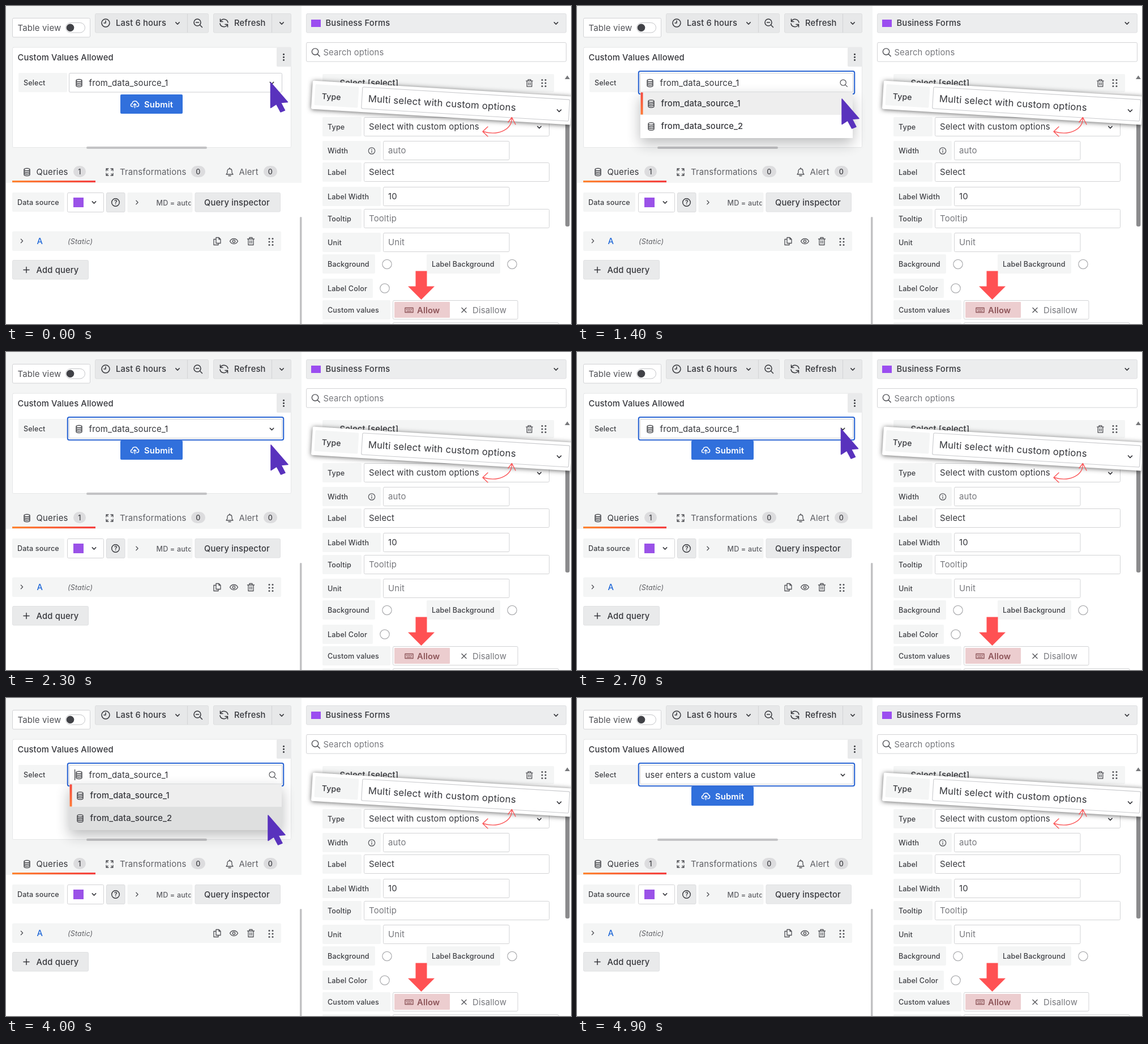
Animation, 998 px wide and 561 px high, one loop 6.2 s. Source, as an HTML page with a canvas:

```html
<!DOCTYPE html>
<html lang="en">
<head>
<meta charset="utf-8">
<title>Custom values</title>
<style>
  html, body { margin: 0; width: 100%; height: 100%; overflow: hidden; background: #fff; }
  canvas { display: block; }
</style>
</head>
<body>
<canvas id="stage" width="998" height="561"></canvas>
<script>
const ctx = document.getElementById('stage').getContext('2d');
const LOOP = 6200, STEP = 100;
const INK = '#36373c', MUTED = '#77787d', SOFT = '#f4f5f5', BUTTON = '#e9eaeb', LINE = '#d2d3d5';
const HOVER = '#dedfdf', PICKED = '#eeeeee', ALLOW = '#8d5559', ICON = '#505156';
const BODY = 14.95;
const SMALL = { size: 12.6, weight: 500, color: '#3f4045' };
const TITLE = { size: 14.75, weight: 500 };
const TYPED = 'user enters a custom value';

function box(x1, y1, x2, y2, fill, stroke, radius = 2, width = 1) {
  ctx.beginPath();
  ctx.roundRect(x1, y1, x2 - x1, y2 - y1, radius);
  if (fill) { ctx.fillStyle = fill; ctx.fill(); }
  if (stroke) { ctx.strokeStyle = stroke; ctx.lineWidth = width; ctx.stroke(); }
}

// y is the vertical middle of the capitals
function text(str, x, y, { size = BODY, weight = 400, color = INK, style = '', align = 'left' } = {}) {
  ctx.font = `${style} ${weight} ${size}px Inter, sans-serif`;
  ctx.letterSpacing = size * 0.0107 + 'px';
  ctx.textAlign = align;
  ctx.fillStyle = color;
  ctx.fillText(str, x, y + size * 0.36);
  return ctx.measureText(str).width;
}

function disc(x, y, r, fill, stroke, width = 1.3) {
  ctx.beginPath();
  ctx.arc(x, y, r, 0, Math.PI * 2);
  if (fill) { ctx.fillStyle = fill; ctx.fill(); }
  if (stroke) { ctx.strokeStyle = stroke; ctx.lineWidth = width; ctx.stroke(); }
}

const ICONS = {
  down: 'M-3.2-1.6L0 1.6L3.2-1.6',
  right: 'M-1.6-3.2L1.6 0L-1.6 3.2',
  plus: 'M-5 0H5M0-5V5',
  cross: 'M-4-4L4 4M4-4L-4 4',
  clock: 'M7 0A7 7 0 1 1-7 0A7 7 0 1 1 7 0M0-4V0H-3',
  zoom: 'M5-1A6 6 0 1 1-7-1A6 6 0 1 1 5-1M3.3 3.3L7.5 7.5',
  minus: 'M-3.5-1H1.5',
  refresh: 'M-6.5-7V-2.5H-2M-6-3A7 7 0 0 1 7-1M6.5 7V2.5H2M6 3A7 7 0 0 1-7 1',
  database: 'M-5-4.5C-5-7.3 5-7.3 5-4.5C5-1.8-5-1.8-5-4.5V4.5C-5 7.3 5 7.3 5 4.5V-4.5M-5-1.5C-5 1.2 5 1.2 5-1.5M-5 1.5C-5 4.2 5 4.2 5 1.5',
  cloud: 'M-3 4H-4C-8 4-8-1-4.5-1.5C-4-7 4-7 4.5-2.5C8-2 8 4 4 4H3M0 6V-1M-2.5 1.2L0-1.3L2.5 1.2',
  process: 'M-6-2V-6H-2M2-6H6V-2M6 2V6H2M-2 6H-6V2M-6-6L-3-3M6-6L3-3M6 6L3 3M-6 6L-3 3',
  bell: 'M-6 4H6L4 1V-2C4-7-4-7-4-2V1ZM-2 6.5H2M0-6V-7.5',
  copy: 'M-2-6.5H3L6-3.5V3.5H-2ZM-2-3.5H-6V6.5H2V3.5M3-6.5V-3.5H6',
  eye: 'M-7 0C-4-6 4-6 7 0C4 6-4 6-7 0ZM2.2 0A2.2 2.2 0 1 1-2.2 0A2.2 2.2 0 1 1 2.2 0',
  trash: 'M-6-4H6M-2.5-4V-6.5H2.5V-4M-4.5-4V6.5H4.5V-4M-1.5-1V3.5M1.5-1V3.5',
  keyboard: 'M-7-4H7V4H-7ZM-4.5-1.3H-3M-1-1.3H1M3-1.3H4.5M-4 1.6H4',
  info: 'M5.7 0A5.7 5.7 0 1 1-5.7 0A5.7 5.7 0 1 1 5.7 0M0-.5V3M0-3V-2'
};
for (const name in ICONS) ICONS[name] = new Path2D(ICONS[name]);

function icon(name, x, y, color = ICON, width = 1.3, scale = 1) {
  ctx.save();
  ctx.translate(x, y);
  ctx.scale(scale, scale);
  ctx.strokeStyle = color;
  ctx.lineWidth = width;
  ctx.lineCap = ctx.lineJoin = 'round';
  ctx.stroke(ICONS[name]);
  ctx.restore();
}

function grip(x, y) {
  for (const dx of [-3, 3]) for (const dy of [-5.5, 0, 5.5]) disc(x + dx, y + dy, 1.5, ICON);
}

function label(str, x1, x2, y) {
  box(x1, y, x2, y + 34, SOFT);
  text(str, x1 + 9, y + 17, SMALL);
}

function field(str, x1, x2, y, color = INK) {
  box(x1 + .5, y + .5, x2 - .5, y + 33.5, '#fff', LINE);
  text(str, x1 + 9, y + 17, { color });
}

function button(str, x1, x2, y, textX) {
  box(x1 + .5, y + .5, x2 - .5, y + 34, BUTTON, '#e0e1e3');
  text(str, textX, y + 17.5, TITLE);
}

function badge(str, x1, x2) {
  box(x1, 282, x2, 302, '#dcdcde', null, 10);
  text(str, (x1 + x2) / 2, 292.5, { ...SMALL, align: 'center' });
}

function drawToolbar() {
  box(11.5, 21.5, 148.5, 55, '#fff', LINE);
  text('Table view', 20.5, 38.5, { color: '#505156' });
  box(105.5, 29.5, 139.5, 47, '#fff', '#c4c5c8', 9);
  disc(113.5, 38.3, 6.8, '#414247');
  box(157.5, 13.5, 357.5, 47, '#e7e8e9', '#dddedf');
  box(366.5, 13.5, 503.5, 47, '#e7e8e9', '#dddedf');
  ctx.fillStyle = '#d3d4d6';
  ctx.fillRect(320, 14, 1, 33);
  ctx.fillRect(469, 14, 1, 33);
  icon('clock', 176, 30, INK, 1.5);
  text('Last 6 hours', 194, 30, TITLE);
  icon('down', 303, 30.5, INK, 1.5);
  icon('zoom', 339, 30, INK, 1.5);
  icon('minus', 339, 30, INK, 1.5);
  icon('refresh', 385, 30, INK, 1.5);
  text('Refresh', 403, 30, TITLE);
  icon('down', 487, 30.5, INK, 1.5);
}

function drawQueries() {
  icon('database', 37, 293, INK);
  text('Queries', 53.5, 292.5);
  badge('1', 119, 141);
  icon('process', 183, 293);
  text('Transformations', 201, 292.5, { color: '#606166' });
  badge('0', 327, 352);
  icon('bell', 395, 293);
  text('Alert', 411.5, 292.5, { color: '#606166' });
  badge('0', 455, 479);
  const tab = ctx.createLinearGradient(11, 0, 158, 0);
  tab.addColorStop(0, '#ff8430');
  tab.addColorStop(1, '#f53e3e');
  ctx.fillStyle = tab;
  ctx.fillRect(11, 308, 147, 3.2);

  label('Data source', 11, 103, 329);
  box(108.5, 329.5, 172.5, 363.5, '#fff', LINE);
  box(119, 338, 137, 355, '#9a52e8', null, 0);
  icon('down', 155.5, 346.5, INK, 1.5);
  box(177.5, 329.5, 210, 363.5, BUTTON, '#dbdcde');
  disc(193.5, 346.5, 6.8, null, INK, 1.4);
  text('?', 194, 346.5, { size: 10.5, weight: 600, align: 'center' });
  box(214.5, 329, 329.5, 364, SOFT);
  icon('right', 231.5, 346.5);
  ctx.save();
  ctx.beginPath();
  ctx.rect(214, 329, 112.5, 35);
  ctx.clip();
  text('MD = auto', 265.5, 347, { ...SMALL, color: '#606166' });
  ctx.restore();
  button('Query inspector', 333.5, 485, 329, 350);

  box(11, 397.5, 486, 432, SOFT);
  icon('right', 28, 414.5);
  text('A', 54.5, 415, { ...TITLE, color: '#2068d8' });
  text('(Static)', 109, 415, { size: SMALL.size, style: 'italic', color: '#606166' });
  icon('copy', 373, 415);
  icon('eye', 402.5, 415);
  icon('trash', 432.5, 415);
  grip(468, 416);
  button('Add query', 11, 146, 448, 53.5);
  icon('plus', 36, 465.5, INK, 1.5);
}

function drawOptions() {
  box(530.5, 13.5, 989.5, 47, '#ecedee', '#dedfe1');
  box(539, 24, 556, 37, '#9b4df0', null, 0);
  text('Business Forms', 564.5, 30, TITLE);
  icon('down', 971.5, 30.5, INK, 1.6);
  box(530.5, 64.5, 989.5, 98, '#fff', LINE);
  icon('zoom', 547, 81.5, ICON, 1.5, .95);
  text('Search options', 560.5, 82, { color: MUTED, size: 14.75 });

  box(559, 120, 968, 152, SOFT);
  icon('down', 575, 136);
  text('Select [select]', 589.5, 136, TITLE);
  icon('trash', 924.5, 136, ICON, 1.4, .95);
  grip(950, 136);
  ctx.fillStyle = '#77787b';
  ctx.fill(new Path2D('M987 129H996L991.5 122.5Z'));
  box(988, 172, 995.5, 389, '#8b8b8d', null, 3);

  label('Type', 559, 628, 196);
  field('Select with custom options', 632, 960, 196);
  icon('down', 942, 214, INK, 1.5);
  label('Width', 559, 662, 238);
  icon('info', 646, 255.5, '#55565b', 1.2);
  field('auto', 666, 889.5, 238, MUTED);
  label('Label', 559, 628, 276);
  field('Select', 632, 960, 276);
  label('Label Width', 559, 662, 319);
  field('10', 666, 889.5, 319);
  label('Tooltip', 559, 628, 358);
  field('Tooltip', 632, 960, 358, MUTED);
  label('Unit', 559, 662, 400);
  field('Unit', 666, 889.5, 400, MUTED);
  label('Background', 559, 652, 438);
  label('Label Background', 743, 873, 438);
  label('Label Color', 559, 648, 481);
  for (const [x, y] of [[673, 455.5], [894, 455.5], [669, 498]]) disc(x, y, 8.2, '#fff', '#aaabae', 1.2);
  label('Custom values', 559, 679, 519);
  box(683.5, 519.5, 904, 552.5, '#fff', LINE);
  box(686, 522, 784, 550, '#eccdcf', null, 1);
  icon('keyboard', 712, 536.5, ALLOW, 1.4);
  text('Allow', 726, 536.5, { ...TITLE, weight: 600, color: ALLOW });
  icon('cross', 809, 536.5, '#55565b', 1.4);
  text('Disallow', 824, 536.5, { color: MUTED });
  box(559, 558, 679, 565, SOFT);
  box(683.5, 558.5, 976, 570, '#fff', LINE);

  ctx.fillStyle = '#ff5153';
  ctx.fill(new Path2D('M723.5 467.5H743.5V494.5H757L733.5 518L710 494.5H723.5Z'));
}

function drawCallout() {
  ctx.save();
  ctx.translate(542, 131.7);
  ctx.rotate(3.5 * Math.PI / 180);
  ctx.save();
  ctx.shadowColor = 'rgba(0,0,0,.6)';
  ctx.shadowBlur = 8;
  ctx.shadowOffsetY = 1;
  box(0, 0, 459, 50, '#fff');
  ctx.restore();
  box(5, 6, 82, 43, SOFT);
  text('Type', 17.5, 26.2, { size: 14, weight: 500 });
  box(88.5, 5.8, 455, 43.8, '#fff', '#c9cacd', 2, 1.1);
  text('Multi select with custom options', 99.5, 25.4, { size: 16.8 });
  icon('down', 437.4, 26.4, INK, 1.5, 1.1);
  ctx.restore();

  ctx.strokeStyle = '#fa5557';
  ctx.lineWidth = 1.4;
  ctx.lineCap = ctx.lineJoin = 'round';
  ctx.stroke(new Path2D('M843 221.5C868 229 894 219 893.5 197M851 213L842 221.5L851 230M887 205L893.5 196.5L900 209'));
}

function sourceRow(n, x, y, font) {
  icon('database', x, y, INK);
  text('from_data_source_' + n, x + 17.5, y - .5, font);
}

function drawMenu(height, drawRows) {
  ctx.save();
  ctx.shadowColor = 'rgba(24,26,30,.3)';
  ctx.shadowBlur = 24;
  ctx.shadowOffsetY = 9;
  box(112, 152.5, 487, 152.5 + height, '#fff');
  ctx.restore();
  drawRows();
}

function drawSourceMenu(first, second) {
  drawMenu(80.5, () => {
    box(112, 152.5, 487, 192, first, null, 0);
    box(112, 192, 487, 233, second, null, 0);
    const bar = ctx.createLinearGradient(0, 152, 0, 192);
    bar.addColorStop(0, '#f5483f');
    bar.addColorStop(1, '#ff7a35');
    ctx.fillStyle = bar;
    ctx.fillRect(112.5, 152.5, 4, 39);
    sourceRow(1, 131, 172.5, TITLE);
    sourceRow(2, 131, 212.5, TITLE);
  });
}

function drawTypedMenu(str) {
  drawMenu(40, () => {
    box(112, 152.5, 487, 192.5, HOVER);
    text(str, 122.5, 172, TITLE);
    text('Hit enter to add', 478, 172, { size: 12.9, color: '#707176', align: 'right' });
  });
}

function drawCaret(x) {
  ctx.fillStyle = INK;
  ctx.fillRect(x, 126, 1.2, 19);
}

const mix = (a, b, k) => a + (b - a) * k;
const clamp = v => Math.min(1, Math.max(0, v));
const ease = k => k * k * (3 - 2 * k);

// time, x and y of the pointer tip
const PATH = [[0, 467.5, 134], [600, 467.5, 134], [1300, 468, 163], [2400, 468, 163],
  [2700, 466.5, 135], [3200, 466.5, 135], [3300, 465, 136], [3800, 463, 206], [LOOP, 463, 206]];

function pointerAt(t) {
  const i = PATH.findIndex(p => p[0] > t);
  const a = PATH[i - 1], b = PATH[i];
  const k = ease((t - a[0]) / (b[0] - a[0]));
  return { x: mix(a[1], b[1], k), y: mix(a[2], b[2], k) };
}

const ARROW = new Path2D('M0 1V45.5L10 39L17.5 53L25 50L18 36.5L30 35.5Z');

function drawPointer({ x, y }) {
  ctx.save();
  ctx.translate(x, y);
  ctx.fillStyle = ctx.strokeStyle = '#5932bd';
  ctx.lineWidth = 1.5;
  ctx.lineJoin = 'round';
  ctx.fill(ARROW);
  ctx.stroke(ARROW);
  ctx.restore();
}

function drawForm(t) {
  const pointer = pointerAt(t);
  const firstOpen = t >= 700 && t < 2300;
  const secondOpen = t >= 2900 && t < 4100;
  const typing = t >= 4100 && t < 4900;
  const open = firstOpen || secondOpen || typing;
  const count = t < 4200 ? 1 : 2 + Math.round((t - 4200) / 25);
  const value = TYPED.slice(0, count);

  box(11.5, 73, 503.5, 249.5, '#fff', '#e6e7e8');
  text('Custom Values Allowed', 20.5, 90.5, TITLE);
  box(478, 73, 504, 107, BUTTON);
  for (const dy of [-5, 0, 5]) disc(490.5, 90.3 + dy, 1.5, INK);
  box(142, 248, 355, 252, '#c3c3c5', null, 2);

  label('Select', 22, 108, 118);
  if (!open) {
    box(202, 156, 312, 190, '#3170dc');
    icon('cloud', 227.5, 173.5, '#fff', 1.5);
    text('Submit', 244, 173.5, { ...TITLE, weight: 600, color: '#fff' });
  }
  if (t >= 700) box(108.8, 115, 490.2, 155.2, '#fff', '#2c66d3', 3, 2.1);
  box(111.5, 118.5, 487.5, 152, '#fff', '#cdced2');
  if (t < 4100) {
    sourceRow(1, 129, 136);
  } else {
    const width = text(value, 120.5, 135.5);
    if (typing) drawCaret(121 + width);
  }
  if (open) icon('zoom', 471, 136, ICON, 1.4, .85);
  else icon('down', 469.5, 136, INK, 1.5);

  if (firstOpen) {
    const shade = Math.round(mix(238, 222, clamp((t - 1400) / 400)));
    drawSourceMenu(`rgb(${shade},${shade},${shade})`, '#fff');
  } else if (secondOpen) {
    const onSecond = pointer.y > 193;
    drawSourceMenu(onSecond ? PICKED : HOVER, onSecond ? HOVER : '#fff');
  } else if (typing) {
    drawTypedMenu(value);
  }
  const focused = firstOpen ? t - 700 : t - 3000;
  if ((firstOpen || secondOpen) && focused >= 0 && focused % 1000 < 500) drawCaret(121);
  if (t < 4100) drawPointer(pointer);
}

function draw(t) {
  ctx.fillStyle = '#fff';
  ctx.fillRect(0, 0, 998, 561);
  ctx.fillStyle = SOFT;
  ctx.fillRect(0, 0, 522, 312);
  box(519, 372, 522.5, 565, '#c2c2c4', null, 1.5);
  drawToolbar();
  drawQueries();
  drawOptions();
  drawCallout();
  drawForm(t);
}

let start, shown;
function tick(now) {
  start ??= now;
  const t = Math.floor((now - start) % LOOP / STEP) * STEP;
  if (t !== shown) draw(shown = t);
  requestAnimationFrame(tick);
}
draw(0);
requestAnimationFrame(tick);
</script>
</body>
</html>
```
